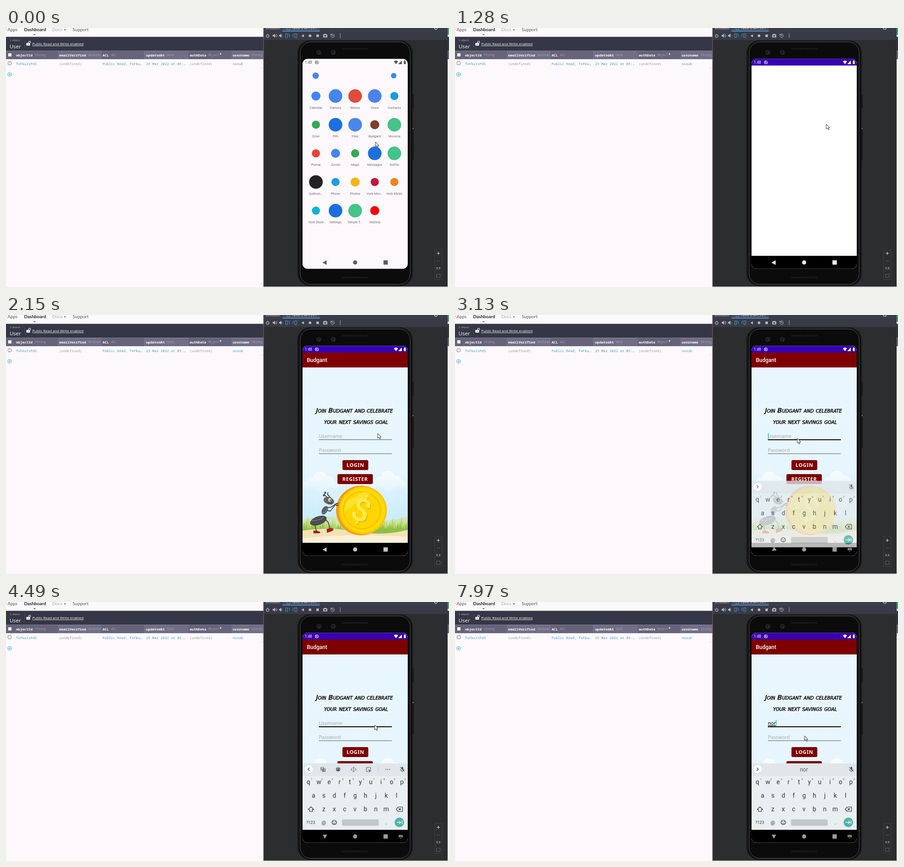
These frames come from a looping animation (977 by 573 pixels, 8000 ms). An HTML page:

```html
<!DOCTYPE html>
<html lang="en">
<head>
<meta charset="utf-8">
<title>Login demo</title>
<style>
html, body { margin: 0; width: 100%; height: 100%; overflow: hidden; background: #fcf8fc; }
svg { display: block; width: 977px; height: 573px; font-family: Roboto, sans-serif; }
text { white-space: pre; }
.mono { font-family: "Noto Sans Mono", monospace; font-size: 7.65px; }
.type { font-family: "Noto Sans Mono", monospace; font-size: 6.4px; fill: #a9a6b8; }
.web { font-family: Lato, sans-serif; }
.form { font-family: "Noto Sans", sans-serif; font-size: 10.7px; }
.hand { font: italic 14.8px "DejaVu Sans", sans-serif; font-variant: small-caps; stroke: #000; stroke-width: .5; filter: drop-shadow(1px 2px 1px #fff); }
.line { fill: none; stroke-linecap: round; stroke-linejoin: round; }
</style>
</head>
<body>
<svg id="stage" viewBox="0 0 977 573"></svg>
<script>
const text = (x, y, s, attrs = '') => `<text x="${x}" y="${y}" ${attrs}>${s}</text>`;
const mid = (x, y, s, attrs = '') => text(x, y, s, `text-anchor="middle" ${attrs}`);
const rect = (x, y, w, h, fill, attrs = '') => `<rect x="${x}" y="${y}" width="${w}" height="${h}" fill="${fill}" ${attrs}/>`;
const disc = (x, y, r, fill, attrs = '') => `<circle cx="${x}" cy="${y}" r="${r}" fill="${fill}" ${attrs}/>`;
const oval = (x, y, rx, ry, fill, turn = 0) => `<ellipse rx="${rx}" ry="${ry}" fill="${fill}" transform="translate(${x} ${y}) rotate(${turn})"/>`;
const shape = (d, fill, attrs = '') => `<path d="${d}" fill="${fill}" ${attrs}/>`;
const line = (d, stroke, width = 1, attrs = '') => `<path class="line" d="${d}" stroke="${stroke}" stroke-width="${width}" ${attrs}/>`;
const group = (id, body, attrs = '') => `<g id="${id}" ${attrs}>${body}</g>`;

function dashboard() {
  const columns = [['objectId', 'String', 22, 64], ['emailVerified', 'Boolean', 117, 182], ['ACL', 'ACL', 213, 232],
    ['updatedAt', 'Date', 309, 355], ['authData', 'Object', 405, 446], ['username', 'String', 500, 542]];
  const cells = ['fxFkuIsPdS', '(undefined)', 'Public Read, fxFku…', '25 Mar 2022 at 05:…', '(undefined)', 'norub'];
  const nav = 'class="web" font-size="10"';
  return rect(0, 0, 569, 573, '#fcf8fc')
    + text(-4, 7, 'y Apps', nav + ' fill="#555"') + text(40, 7, 'Dashboard', nav + ' font-weight="bold" fill="#222"')
    + text(102, 7, 'Docs', nav + ' fill="#aaa"') + shape('M128 3h4l-2 3z', '#555') + text(147, 7, 'Support', nav + ' fill="#555"')
    + rect(61, 14, 4, 1.5, '#444')
    + rect(0, 19.5, 569, 31, '#353646')
    + text(8, 29, '1 object', 'class="web" font-size="6.5" fill="#a5a5b5"')
    + text(8, 45, 'User', 'font-family="Open Sans, sans-serif" font-size="11.5" fill="#fff"')
    + rect(41, 28, 1, 15, '#4c4d5e')
    + rect(45, 33, 8, 6, '#fff') + line('M50 33v-2a2 2 0 0 1 4 0v2', '#fff', 1.2) + rect(48.3, 35, 1.4, 2, '#353646')
    + text(58, 38, 'Public Read and Write enabled', 'font-family="Open Sans, sans-serif" font-size="7.95" fill="#fff" text-decoration="underline"')
    + columns.map((c, i) => rect(i ? 18 + i * 95.8 : 0, 50.5, 96 + (i ? 0 : 18), 18.5, i % 2 ? '#716e86' : '#66637a')
      + text(c[2], 63, c[0], 'class="mono" font-weight="bold" fill="#fff"') + text(c[3], 62, c[1], 'class="type"')
      + text(c[2], 82, cells[i], `class="mono" fill="${i == 1 || i == 4 ? '#999' : '#3a9fcf'}"`)).join('')
    + text(471, 63, '*', 'font-size="10" fill="#fff"')
    + rect(5, 56, 7, 7, '#fff') + rect(4.5, 74.5, 7, 7, '#fff', 'rx="1.5" stroke="#777"')
    + disc(8, 102.5, 4.2, 'none', 'stroke="#2aa7e0"') + line('M6 102.5h4M8 100.5v4', '#2aa7e0')
    + rect(561, 88, 8, 1, '#e0dde2');
}

function emulator() {
  const ink = '#b8bac0';
  const label = 'font-size="8" fill="#c4c6cc"';
  return rect(568, 0, 406, 572, '#2c2d2f') + rect(567.5, 0, 1, 573, '#8b6468')
    + rect(569, 0, 405, 8, '#3a3e4b') + rect(610, 0, 82, 8, '#4b5060') + rect(610, 6, 82, 2, '#4a87c5')
    + text(573, 3, 'Emulator:', label) + text(630, 3, 'Tavix 3 API 29', label) + line('M620 0v4h6v-4', '#4ba0d0') + line('M682 0l3 3m0-3l-3 3', '#888')
    + rect(569, 8, 405, 18.5, '#383b46') + disc(948, 0, 3, 'none', 'stroke="#b8bac0" stroke-width="1.6"')
    + line('M575 15a3.2 3.2 0 1 0 4 0M577 13v4', ink, 1.2)
    + [589, 603].map(x => shape(`M${x - 1} 15.5h2l3-3v9l-3-3h-2z`, ink)).join('')
    + line('M594 15q2 2 0 4M596 13.5q3 3.5 0 7M608 15q2 2 0 4', ink)
    + line('M617 13h4v8h-4zM623 13q3 1 2 6M641 13h-4v8h4zM635 13q-3 1-2 6', '#43a0d8')
    + shape('M657 14v6.5l-5.5-3.2z', ink) + disc(670.5, 17.2, 2.9, ink) + rect(684.5, 14.5, 5.5, 5.5, ink)
    + rect(699.5, 14, 9, 7, ink, 'rx="1"') + disc(704, 17.5, 2, '#383b46') + rect(702, 13, 4, 2, ink)
    + line('M717 15a4 4 0 1 1-.5 3M716 13v2.5h2.5M720 15v2.5h2', ink) + [13.5, 17, 20.5].map(y => disc(737, y, 1, ink)).join('')
    + rect(974, 0, 3, 573, '#f4f2f5') + rect(974, 0, 3, 15, '#43a06a') + rect(974, 19.5, 3, 31, '#353646') + rect(974, 50.5, 3, 18.5, '#66637a')
    + rect(568, 572, 409, 1, '#d5d3d7')
    + rect(945.5, 489.5, 16, 67, 'none', 'stroke="#3f4042"') + line('M950.5 498.5h6M953.5 495.5v6', '#d8d8d8', 1.2) + line('M950.5 515.5h6', '#606163')
    + mid(953.5, 534, '1:1', 'font-size="7" font-weight="bold" fill="#d8d8d8"') + rect(949.5, 544.5, 8, 7, 'none', 'stroke="#606163"')
    + rect(895, 147, 4, 31, '#151516') + rect(895, 220, 4, 73, '#151516') + rect(897, 221, 1.5, 3, '#999')
    + rect(643, 27.5, 254, 543, '#070708', 'rx="28"') + rect(644.5, 29, 251, 540, 'none', 'rx="27" stroke="#303032"')
    + rect(648.5, 31, 243, 536, '#0b0b0c', 'rx="24" stroke="#5c5c5f"')
    + [690, 722].map(x => disc(x, 54, 5.5, '#232426') + disc(x, 54, 2.8, '#11151a') + disc(x + 1.5, 55, 1.2, '#3c4146')).join('')
    + [46, 552].map(y => line(`M742 ${y}H798`, '#29292b', 4, 'stroke-dasharray="1 1.5" style="stroke-linecap:butt"')).join('');
}

const green = '#43c488', blue = '#1c6fde';
const apps = [
  ['Calendar', '#4285f4', 10], ['Camera', '#4685ec', 15], ['Wexlor', '#e24a3b', 15], ['Clock', '#4c83ea', 15], ['Contacts', '#1a9be0', 9],
  ['Drive', '#34a853', 9], ['Pim', blue, 15], ['Files', '#4a86ee', 15], ['Budgant', '#80402e', 10], ['Movorra', green, 15],
  ['Pomal', '#ea4335', 9], ['Zorvel', '#4285f4', 10], ['Maps', '#34a853', 9], ['Messages', blue, 15], ['DoPlix', green, 15],
  ['Quillosn...', '#222', 15], ['Phone', '#1e9be9', 9], ['Photos', '#fbb414', 10], ['Vorb Mov...', '#c8143f', 9], ['Vorb Music', '#f58220', 9],
  ['Vorb Store', '#10b4d8', 9], ['Settings', blue, 15], ['Simple T...', green, 15], ['VidZorp', '#f00', 10]];

function drawer() {
  const icons = apps.map(([name, color, r], i) => {
    const x = 683.5 + i % 5 * 43.25, y = 150.5 + Math.floor(i / 5) * 63.4;
    return group(i == 8 ? 'tapped' : 'app' + i, disc(x, y, r, color) + mid(x, y + 28, name, 'font-size="7.2" fill="#6d6b72"'));
  }).join('');
  return rect(654, 68, 232, 465, '#fcf8fc')
    + group('wallpaper', shape('M654 423Q710 411 770 419T886 402V495H654z', '#f0ecf1') + shape('M654 447q28-20 65-8t70-2q34-2 50 8t47-19v69H654z', '#e9e6ec')
      + rect(654, 523, 232, 10, '#e9e6ec') + line('M668 105q4 3 10 3H860q8 0 12-4', '#dedbe0'))
    + group('sheet', disc(683, 105.5, 7, '#4285f4') + disc(855, 105.5, 6, '#4285f4') + icons);
}

function grass(base, height, phase) {
  let d = `M654 ${base}`;
  for (let x = 654; x < 886; x += 3) {
    const tip = base - height * (.55 + .45 * Math.sin(x * 12.9 + phase)) - Math.abs(x - 770) * .08;
    d += `L${x + 1.5 + 2 * Math.sin(x + phase)} ${tip}L${x + 3} ${base - 4}`;
  }
  return d + 'V492H654z';
}

function ant() {
  const dark = '#4b4d51';
  return line('M693 452l-11 13 2 12M699 447l12 12 3 14M704 431l11 3 11-14M706 427l11-2 12-8M709 404l-7-6 2-4M714 402l-5-5 1-4', dark, 2)
    + disc(704, 393, 2.2, dark) + disc(701, 399, 2.2, dark)
    + oval(689, 455, 19, 9.5, dark, -20) + oval(703, 432, 10, 6, '#5d5f63', -60) + oval(712, 411, 12, 8, '#65676b', 20)
    + line('M675 455q13 1 25-7M696 437q8 2 12-7', '#85878a', 1.3)
    + oval(714, 409, 3.2, 4.2, '#f3e4b0') + disc(715, 410, 1.4, '#222') + line('M710 404l7 0', '#222', 1.2) + line('M710 415q5 3 9 0', '#242424')
    + line('M726 419l7-3M728 421h5', '#333', 1.8)
    + shape('M678 477h8l7 3q1 3-4 3h-11z', '#a3201f') + shape('M707 474l9-3 6 2q1 3-3 5l-11 4z', '#a3201f');
}

function coin() {
  const dollar = (x, y, fill) => mid(x, y, '$', `font-size="70" font-weight="500" fill="${fill}" transform="rotate(20 784 432)"`);
  return disc(783, 432.5, 55, '#f09c12') + disc(787, 432, 53, '#ffc20e') + disc(787, 432, 49.5, '#ffda00')
    + disc(785, 432, 41, '#ffd600', 'stroke="#f8bd00" stroke-width="2.5"')
    + shape('M749 414l42-24 14 5-60 40z', '#fff36b', 'opacity=".4"') + dollar(785.5, 457.5, '#f0b400') + dollar(783, 456, '#ffe94a');
}

function scenery() {
  const cloud = (x, y) => [[0, 0, 15], [-18, 9, 11], [17, 8, 13], [-31, 16, 8], [33, 15, 9], [0, 16, 15]]
    .map(c => disc(x + c[0], y + c[1], c[2], 'url(#cloud)')).join('');
  return rect(654, 116, 232, 388, 'url(#sky)') + cloud(693, 361) + cloud(842, 360)
    + shape('M654 452q55-12 110 0t122-6v50H654z', '#cfe8b4')
    + shape(grass(472, 20, 0), '#b5d465') + shape(grass(478, 15, 2), '#8fbe45')
    + shape('M654 477q60-9 120 2t112-4v30H654z', '#f2e2b6') + shape('M654 494q110-12 232-3v13H654z', '#f9f0d6')
    + coin() + ant();
}

const maroon = '#7e0000';
function button(x, y, w, label) {
  return rect(x, y, w, 22, maroon, 'rx="3"')
    + mid(x + w / 2, y + 15, label, 'font-family="Noto Sans, sans-serif" font-weight="600" font-size="11" letter-spacing=".6" fill="#fff"');
}

function login() {
  return rect(654, 83, 232, 33, maroon) + text(663.5, 104, 'Budgant', 'font-size="12" font-weight="500" fill="#fff"')
    + scenery() + mid(768.5, 216, 'Join Budgant and celebrate', 'class="hand"') + mid(772, 241, 'your next savings goal', 'class="hand"')
    + text(690, 272, 'Username', 'id="hint" class="form" fill="#a4a9ad"') + text(690, 272, '', 'id="typed" class="form" text-decoration="underline"')
    + rect(690, 275, 161, 1, '#444', 'id="underline"') + rect(690, 261, 1.5, 13, '#1fc5ae', 'id="caret"')
    + text(690, 303, 'Password', 'class="form" fill="#a4a9ad"') + rect(690, 306.3, 161, 1, '#555')
    + button(742, 321, 57, 'LOGIN') + button(731, 352, 78, 'REGISTER');
}

function keyboard() {
  const ink = '#30353a', small = '#555a60';
  const row = (keys, x, y) => [...keys].map((k, i) => mid(x + i * 22.9, y, k, `font-size="14" fill="${ink}"`)).join('');
  const digits = [...'1234567890'].map((d, i) => mid(674 + i * 22.9, 394, d, `font-size="6" fill="${small}"`)).join('');
  const tools = line('M694.5 366h6v6h-6zM698 369h6v6h-6zM696 369h3M700 374l1-3 1 3', small, 1.2)
    + disc(732.5, 370, 4.8, small) + [[730, 370], [731, 367], [734, 367], [735, 370]].map(p => disc(...p, 1, '#e0e6e9')).join('')
    + line('M766.5 366v9M765 366h3M765 375h3M763 368l-2 2.5 2 2.5M770 368l2 2.5-2 2.5', small, 1.1)
    + line('M800 375h-5v-9h9v4M800 371l5 2-2 1-1 2z', small, 1.2) + rect(821, 364, 1, 12, '#c6ccd0')
    + [838, 842, 846].map(x => disc(x, 370.5, 1.1, small)).join('');
  return rect(654, 357, 232, 147, '#e9eef1') + rect(654, 357, 232, 28, '#e0e6e9')
    + disc(667.5, 370, 9, '#fff') + line('M666 367l3 3-3 3', '#333', 1.3, 'id="chevron"') + group('tools', tools) + mid(769.5, 374.5, '', 'id="suggestion" font-size="12" fill="#5b6065"')
    + rect(872.2, 364.5, 4, 7, small, 'rx="2"') + line('M870 370q0 4 4 4t4-4M874 374v2M869.5 365.5l9 9', small, 1.1)
    + row('qwertyuiop', 667, 403) + digits + row('asdfghjkl', 678.3, 433) + row('zxcvbnm', 701, 463)
    + line('M672.5 453l6 6h-3v4.5h-6v-4.5h-3z', ink, 1.2) + line('M865 453.5h9.5v10H865l-4.5-5zM866.5 456.5l4 4m0-4l-4 4', ink, 1.2)
    + mid(672, 491, '?123', `font-size="9" fill="${ink}"`) + mid(701, 492, '@', `font-size="11" fill="${ink}"`)
    + disc(724, 487.5, 5, 'none', `stroke="${ink}" stroke-width="1.2"`) + disc(722, 486, .9, ink) + disc(726, 486, .9, ink) + line('M721.5 489q2.5 3 5 0', ink)
    + rect(741, 481, 81, 14, '#c3c7ca', 'rx="2"') + mid(839, 492, '.', `font-size="13" fill="${ink}"`)
    + disc(867.5, 487.5, 10.5, '#4cb5a9') + line('M862 487.5h9M868 484.5l3 3-3 3M873.5 484v7', '#fff', 1.3);
}

const statusIcons = text(659, 79, '1:48', 'font-size="8.3"') + disc(685.5, 76, 3.6, 'none', 'stroke="currentColor"') + line('M683.5 74.5l4 3M684 78l2-4', 'currentColor')
  + shape('M855.5 74q4.5-4 9 0l-4.5 6zM873 72v8h-8z', 'currentColor') + rect(877.5, 72.5, 4, 7.5, 'currentColor', 'rx=".8"') + rect(878.5, 71.5, 2, 1, 'currentColor');
const navIcons = shape('M707 514v10l-9-5z', 'currentColor', 'id="back"') + disc(770, 518.7, 4.6, 'currentColor') + rect(832.5, 514, 9.5, 9.5, 'currentColor', 'rx=".5"');

document.getElementById('stage').innerHTML = `<defs>
  <linearGradient id="sky" x2="0" y2="1"><stop stop-color="#e9f6fe"/><stop offset=".6" stop-color="#e6f5fe"/><stop offset=".85" stop-color="#cbedfb"/></linearGradient>
  <linearGradient id="cloud" gradientUnits="userSpaceOnUse" x2="0" y1="345" y2="388"><stop stop-color="#fafdff"/><stop offset="1" stop-color="#e2f4fd"/></linearGradient>
  <clipPath id="screenClip">${rect(654, 68.3, 232, 464.4, '#000', 'rx="11"')}</clipPath>
  <clipPath id="windowClip">${rect(0, 0, 0, 0, '#000', 'id="windowShape"')}</clipPath></defs>`
  + dashboard() + emulator()
  + group('screen', drawer()
    + group('window', rect(654, 68, 232, 465, '#fff', 'id="splash"') + disc(0, 0, 14, '#80402e', 'id="splashIcon"') + rect(654, 68, 232, 15, '#3700b3', 'id="statusBar"'), 'clip-path="url(#windowClip)"')
    + group('login', login()) + rect(654, 504, 232, 29, '#000', 'id="navBar"') + group('status', statusIcons, 'fill="currentColor"')
    + group('nav', navIcons) + group('imeButton', rect(866, 515.5, 9, 5, '#aaa') + line('M867 517.5h7M868 519.5h5', '#000', .8, 'stroke-dasharray="1 1"') + shape('M869 522h3l-1.5 1.5z', '#aaa'))
    + group('keyboard', keyboard()), 'clip-path="url(#screenClip)"')
  + shape('M0 0V10.5L2.5 8.3 4.3 12.3 6 11.5 4.3 7.8H7.5z', '#fff', 'id="cursor" stroke="#222" stroke-width=".9"');

const $ = id => document.getElementById(id);
const set = (id, attrs) => { for (const name in attrs) $(id).setAttribute(name, attrs[name]); };
const ramp = (t, a, b) => Math.min(1, Math.max(0, (t - a) / (b - a)));
const show = (id, opacity) => set(id, { opacity: +opacity });

// Linear interpolation between rows of [time, ...values].
function track(t, rows) {
  const i = rows.findIndex(row => row[0] > t);
  if (i < 0) return rows.at(-1).slice(1);
  if (i == 0) return rows[0].slice(1);
  const [a, b] = [rows[i - 1], rows[i]], k = ramp(t, a[0], b[0]);
  return a.slice(1).map((v, j) => v + (b[j + 1] - v) * k);
}

const cursorPath = [[270, 815, 252], [320, 799, 203], [450, 799, 203], [510, 819, 213], [1870, 819, 213], [1960, 834, 199], [2150, 820, 262],
  [2640, 755, 273], [3300, 755, 273], [3850, 860, 373], [3900, 860, 373], [4180, 813, 272], [7850, 813, 272], [7970, 771, 296]];
const windowPath = [[790, 798, 199, 30, 30, 15, 3, .4], [910, 764, 231, 72, 72, 36, 4, .75], [1180, 654, 68, 232, 465, 11, 15, 1]];
const caretFlips = [2920, 3430, 3920, 4490, 4950, 5450, 5980, 7220, 7710];

function draw(t) {
  set('cursor', { transform: `translate(${track(t, cursorPath)})` });

  const leave = track(t, [[790, 0, 1], [910, -10, .86], [1180, -16, .4]]);
  set('sheet', { transform: `translate(0 ${leave[0]})`, opacity: leave[1] });
  show('wallpaper', ramp(t, 790, 910));
  show('tapped', t < 790);

  const [x, y, width, height, rx, bar, alpha] = track(t, windowPath);
  show('window', t >= 790);
  set('windowShape', { x, y, width, height, rx });
  set('splash', { opacity: alpha, fill: t < 1000 ? '#f4faf6' : '#fff' });
  set('splashIcon', { cx: x + width / 3, cy: y + height / 2, opacity: .12 * (1 - ramp(t, 910, 1050)) });
  set('statusBar', { y, height: bar });
  show('navBar', ramp(t, 1100, 1280));
  set('status', { color: t < 1080 ? '#56545c' : '#fff' });

  show('login', t < 1490 ? 0 : Math.min(1, (Math.floor((t - 1490) / 80) + 1) / 4));
  const typed = 'nor'.slice(0, (t >= 6410) + (t >= 6530) + (t >= 6720));
  $('typed').textContent = $('suggestion').textContent = typed;
  show('hint', !typed);
  set('underline', t < 2920 ? { y: 275.3, height: 1, fill: '#444' } : { y: 275, height: 2, fill: '#000' });
  const blinkOn = caretFlips.filter(flip => flip <= t).length % 2;
  set('caret', { x: 690 + (typed ? $('typed').getComputedTextLength() : 0), opacity: blinkOn });

  const [drop, fade] = track(t, [[3070, 24, .35], [3130, 10, .78], [3230, 0, 1]]);
  set('keyboard', { transform: `translate(0 ${drop})`, opacity: t < 3070 ? 0 : fade });
  show('imeButton', t >= 3070);
  set('back', { transform: `rotate(${-90 * ramp(t, 3070, 3230)} 703 518.7)` });
  set('nav', { color: t < 1080 ? '#5e5c64' : t < 1570 ? '#fff' : t < 3070 ? '#c4c4c4' : '#9b9b9b' });
  const expanded = t >= 3500 && t < 6410;
  show('tools', expanded ? ramp(t, 3500, 3800) : 0);
  set('chevron', { transform: expanded ? 'rotate(180 667.5 370)' : '' });
}

const start = performance.now();
(function frame() {
  draw((performance.now() - start) % 8000);
  requestAnimationFrame(frame);
})();
</script>
</body>
</html>
```
